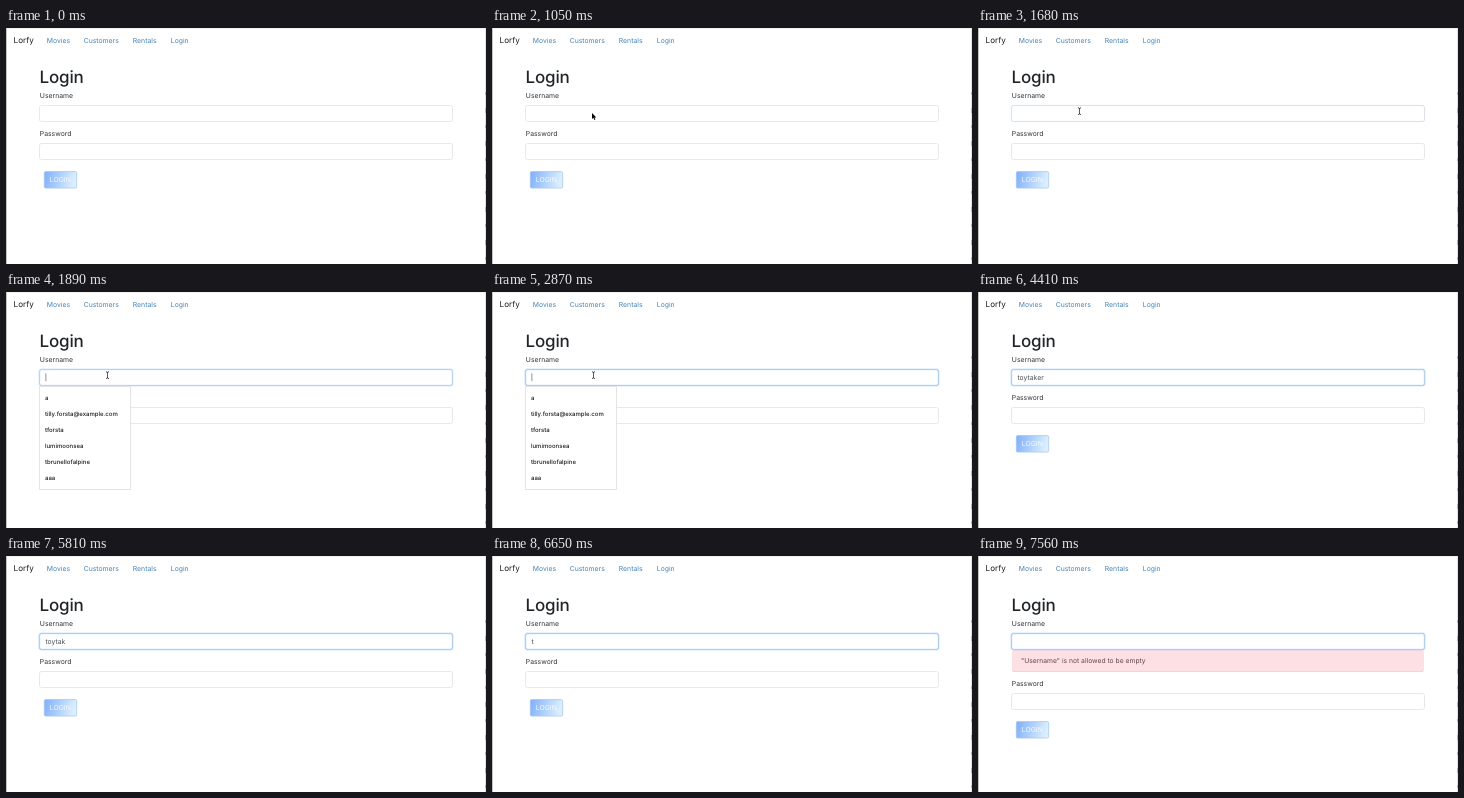
Write an HTML page that moves like this. It is 480x236 px and loops after 8000 ms.

```html
<!DOCTYPE html>
<html lang="en">
<head>
<meta charset="utf-8">
<title>Login form</title>
<style>
  html, body { margin: 0; width: 100%; height: 100%; overflow: hidden; background: #fff; }
  svg { display: block; width: 480px; height: 236px; }
  text { font: 6.85px Inter, "Open Sans", sans-serif; fill: #2f3439; text-rendering: geometricPrecision; white-space: pre; }
  .brand { font-size: 8.1px; fill: #1d1f21; }
  .link { fill: #4483b6; }
  .title { font-size: 17px; font-weight: 500; letter-spacing: -.2px; fill: #212529; }
  .field { fill: #fff; stroke: #e6e8ea; }
  .typed { fill: #495057; }
  .option { font-size: 6px; font-weight: 500; fill: #1c1c1c; }
  .alert { fill: #fde0e3; }
  .alert-text { font-size: 6.75px; fill: #66434a; }
  .btn-text { fill: #fff; fill-opacity: .85; }
</style>
</head>
<body>
<svg viewBox="0 0 480 236">
  <defs>
    <linearGradient id="blue" x1="0" y1="0" x2="1" y2="0.15">
      <stop offset="0" stop-color="#7eaefb"/>
      <stop offset="1" stop-color="#dbeffd"/>
    </linearGradient>
  </defs>

  <path d="M0 .5H480" stroke="#f1f1f1"/>
  <path d="M.5 0V236" stroke="#c4c4c4"/>
  <path d="M479.5 0V236" stroke="#e2e2e2"/>
  <path d="M479.5 64V236" stroke="#b4b4b4" stroke-dasharray="3 13 5 12"/>

  <text class="brand" x="7.6" y="15.2">Lorfy</text>
  <g id="nav"></g>
  <text class="title" x="33.6" y="55">Login</text>
  <text x="33.8" y="70.3">Username</text>

  <g id="lower">
    <text x="33.8" y="108.4">Password</text>
    <rect class="field" x="33.5" y="115.5" width="413" height="16" rx="2"/>
    <rect x="38.3" y="143.6" width="32.4" height="16.5" rx="1.4" fill="url(#blue)" stroke="#a3c4ea" stroke-width=".7"/>
    <text class="btn-text" x="43.8" y="154.3">LOGIN</text>
  </g>

  <g id="alert">
    <rect class="alert" x="34" y="94" width="412" height="22" rx="2"/>
    <path d="M35 115.5H445" stroke="#f3d3d7"/>
    <text class="alert-text" x="43" y="107.4">"Username" is not allowed to be empty</text>
  </g>

  <rect class="field" x="33.5" y="77.5" width="413" height="16" rx="2"/>
  <g id="focus" fill="none">
    <rect x="33.3" y="77.3" width="413.4" height="16.4" rx="2.4" stroke="#007bff" stroke-opacity=".13" stroke-width="2.2"/>
    <rect x="33.5" y="77.5" width="413" height="16" rx="2" stroke="#b0cfea"/>
  </g>
  <text id="typed" class="typed" x="39.4" y="87.9"></text>
  <rect id="caret" y="81.4" width=".8" height="7.8" fill="#777"/>

  <g id="menu">
    <rect x="34" y="95" width="91" height="103" fill="#000" opacity=".05"/>
    <rect x="33.5" y="94.5" width="91" height="103" fill="#fff" stroke="#e4e4e4"/>
  </g>

  <path id="arrow" d="M0 0V6L1.4 4.8L2.4 7L3.4 6.5L2.4 4.4H4.3Z" fill="#000" stroke="#fff" stroke-width=".6" paint-order="stroke"/>
  <path id="beam" d="M100 79.7Q101.5 79.7 101.5 81Q101.5 79.7 103 79.7M101.5 80.6V85.9M100 86.6Q101.5 86.6 101.5 85.4Q101.5 86.6 103 86.6" fill="none" stroke="#333" stroke-width=".8"/>
</svg>
<script>
const LOOP = 8000, TICK = 70, NAME = "toytaker";
const $ = id => document.getElementById(id);

function addText(parent, cls, x, y, str) {
  const t = document.createElementNS("http://www.w3.org/2000/svg", "text");
  t.setAttribute("class", cls);
  t.setAttribute("x", x);
  t.setAttribute("y", y);
  t.textContent = str;
  parent.append(t);
}

[["Movies", 40.8], ["Customers", 77.7], ["Rentals", 126.8], ["Login", 164.8]]
  .forEach(([s, x]) => addText($("nav"), "link", x, 14.8, s));
["a", "tilly.forsta@example.com", "tforsta", "lumimoonsea", "tbrunellofalpine", "aaa"]
  .forEach((s, i) => addText($("menu"), "option", 39, 107.8 + 16 * i, s));

// [time, letters typed]
const KEYS = [[0, 0], [3220, 1], [3430, 2], [3500, 3], [3570, 4], [3640, 5], [3780, 6], [3850, 7], [3920, 8],
  [5670, 7], [5810, 6], [6020, 5], [6160, 4], [6300, 3], [6440, 2], [6650, 1], [6790, 0]];
// [time, caret visible]
const BLINK = [[0, 0], [1750, 1], [2310, 0], [2870, 1], [4410, 0], [4970, 1], [5460, 0],
  [6020, 1], [6510, 0], [7070, 1], [7560, 0]];

const at = (steps, t) => steps.findLast(s => s[0] <= t)[1];
const clamp = v => Math.max(0, Math.min(1, v));
const show = (id, on) => $(id).style.display = on ? "" : "none";

function draw(now) {
  const t = now % LOOP;
  const count = at(KEYS, t), empty = t >= 6790;

  $("typed").textContent = NAME.slice(0, count);
  const width = count ? $("typed").getComputedTextLength() : 0;
  $("caret").setAttribute("x", 39.5 + width);
  show("caret", at(BLINK, t));

  const tick = Math.floor(t / TICK) * TICK;
  $("focus").style.opacity = clamp((tick - 1610) / 350);
  show("menu", t >= 1820 && t < 3220);
  show("alert", empty);
  $("lower").setAttribute("transform", `translate(0 ${empty ? 22 : 0})`);

  const left = (1 - clamp((tick - 420) / 630)) ** 2;
  $("arrow").setAttribute("transform", `translate(${100 + 129 * left} ${85 + 141 * left})`);
  show("arrow", t >= 420 && t < 1190);
  show("beam", t >= 1190 && t < 3220);
}

const start = performance.now();
function frame() {
  draw(performance.now() - start);
  requestAnimationFrame(frame);
}
frame();
</script>
</body>
</html>
```
